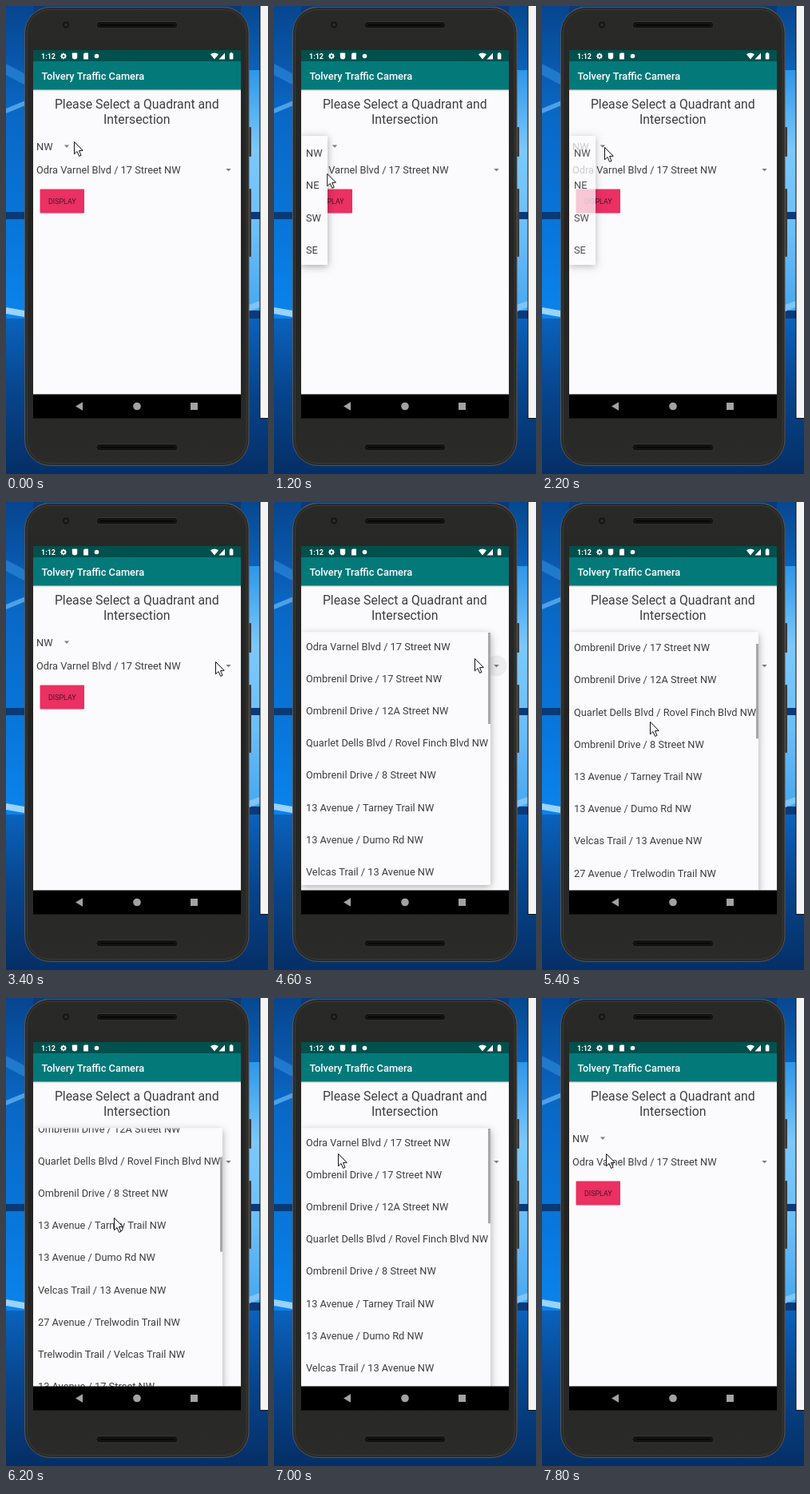
These frames come from a looping animation (328 px wide and 584 px high, 8 s). An HTML page with a canvas:

```html
<!DOCTYPE html>
<html lang="en">
<head>
<meta charset="utf-8">
<title>Traffic camera app</title>
<style>
html, body { margin: 0; width: 100%; height: 100%; overflow: hidden; background: #0a3a78; }
canvas { display: block; width: 328px; height: 584px; }
</style>
</head>
<body>
<canvas id="stage" width="328" height="584"></canvas>
<script>
const ctx = document.getElementById('stage').getContext('2d');
const LOOP = 8000, STEP = 200;
const ROW = 40.2, BODY = 12.8;
const LEFT = 34, RIGHT = 294;
const PAGE = '#fbfafd', INK = '#3e3e40', NAV = '#a3a3a3';

const quadrants = ['NW', 'NE', 'SW', 'SE'];
const crossings = [
  'Odra Varnel Blvd / 17 Street NW',
  'Ombrenil Drive / 17 Street NW',
  'Ombrenil Drive / 12A Street NW',
  'Quarlet Dells Blvd / Rovel Finch Blvd NW',
  'Ombrenil Drive / 8 Street NW',
  '13 Avenue / Tarney Trail NW',
  '13 Avenue / Dumo Rd NW',
  'Velcas Trail / 13 Avenue NW',
  '27 Avenue / Trelwodin Trail NW',
  'Trelwodin Trail / Velcas Trail NW',
  '13 Avenue / 17 Street NW',
  '13 Avenue / 22 Street NW'
];

const ramp = (t, from, to) => Math.min(1, Math.max(0, (t - from) / (to - from)));

function pointerAt(t) {
  let x = 85, y = 169;
  const move = (from, to, tx, ty) => {
    const p = ramp(t, from, to);
    x += (tx - x) * p;
    y += (ty - y) * p;
  };
  move(200, 600, 78, 176);
  move(2200, 3200, 262, 199);
  move(3400, 4200, 275, 204);
  move(4400, 4600, 251, 195);
  move(4600, 5200, 135, 274);
  move(6600, 7000, 80, 194);
  const browse = Math.sin(Math.PI * ramp(t, 1000, 2000));
  return [x - 20 * browse, y + 56 * browse];
}

// the wheel speeds up on the way down and again on the way back
const scrollAt = t => 130 * (ramp(t, 5000, 5600) ** 3 - ramp(t, 5800, 6600) ** 2);

function rect(x, y, w, h, fill) {
  ctx.fillStyle = fill;
  ctx.fillRect(x, y, w, h);
}

function round(x, y, w, h, r, fill, stroke) {
  ctx.beginPath();
  ctx.roundRect(x, y, w, h, r);
  ctx.fillStyle = fill;
  ctx.fill();
  if (!stroke) return;
  ctx.strokeStyle = stroke;
  ctx.lineWidth = 1;
  ctx.stroke();
}

function disc(x, y, r, fill) {
  ctx.beginPath();
  ctx.arc(x, y, r, 0, Math.PI * 2);
  ctx.fillStyle = fill;
  ctx.fill();
}

function poly(points, fill) {
  ctx.beginPath();
  points.forEach(([x, y]) => ctx.lineTo(x, y));
  ctx.closePath();
  ctx.fillStyle = fill;
  ctx.fill();
}

function text(str, x, y, size = BODY, fill = INK, align = 'left', weight = 400) {
  ctx.font = `${weight} ${size}px Roboto, sans-serif`;
  ctx.textAlign = align;
  ctx.fillStyle = fill;
  ctx.fillText(str, x, y);
}

function gradient(y0, y1, ...colors) {
  const g = ctx.createLinearGradient(0, y0, 0, y1);
  colors.forEach((c, i) => g.addColorStop(i / (colors.length - 1), c));
  return g;
}

function beam(x, y, w, rise, thick, fill) {
  poly([[x, y], [x + w, y - rise], [x + w, y - rise + thick], [x, y + thick]], fill);
}

function drawDesktop() {
  rect(0, 0, 34, 390, gradient(0, 390, '#07458f', '#0a67c4', '#0874d8', '#0a84ec'));
  rect(0, 390, 328, 194, gradient(390, 584, '#0a62bc', '#07438a', '#052f66'));
  rect(294, 0, 24, 80, gradient(0, 80, '#06488f', '#0c62b8'));
  rect(294, 80, 24, 300, gradient(80, 380, '#2e96e8', '#7cc8fb', '#6cbef8', '#48a8f0'));
  beam(0, 72, 34, -18, 14, 'rgba(70,165,245,.4)');
  beam(0, 128, 34, 14, 6, 'rgba(120,200,255,.6)');
  beam(0, 376, 34, -6, 8, 'rgba(190,230,255,.8)');
  beam(294, 376, 24, 8, 8, 'rgba(160,215,255,.6)');
  for (const x of [0, 294]) rect(x, 257, 24, 9, '#083a78');
  rect(317.5, 0, 11, 515, '#111');
  rect(318.5, 0, 10, 514, '#f4f4f5');
}

function drawPhone() {
  for (const [y, h] of [[151, 37], [228, 85]]) round(304, y, 3, h, 1, '#3a3a3a');
  round(23.5, 1.5, 280.5, 572, 32, '#2a2a29', '#565654');
  round(26.5, 4.5, 274.5, 566, 29, gradient(0, 574, '#292928', '#232322', '#2a2a28'), '#393937');
  for (const y of [19.5, 546.5]) {
    round(113, y, 102, 8.5, 4, '#131313', '#363634');
    rect(118, y + 3.5, 92, 1.5, '#060606');
  }
  disc(75, 23.5, 4, '#151515');
  disc(75, 23.5, 2, '#2c2c31');
}

function drawStatusIcons() {
  const y = 62.5;
  for (let a = 0; a < 8; a++) {
    disc(72 + 3.2 * Math.cos(a * Math.PI / 4), y + 3.2 * Math.sin(a * Math.PI / 4), 0.8, '#fff');
  }
  disc(72, y, 3, '#fff');
  disc(72, y, 1.2, '#00504d');
  round(82.8, y - 4, 6.4, 8, [1, 1, 4, 4], '#fff');
  round(97, y - 4, 6, 8, [2, 0.5, 0.5, 0.5], '#fff');
  disc(113.5, y, 2.8, '#fff');
  ctx.beginPath();
  ctx.moveTo(261, y + 4);
  ctx.arc(261, y + 4, 8, -Math.PI * 0.72, -Math.PI * 0.28);
  ctx.fill();
  poly([[274, y - 4], [274, y + 4], [266.5, y + 4]], '#fff');
  round(279.8, y - 3.5, 4.6, 7.6, 0.8, '#fff');
  rect(281, y - 4.5, 2.2, 1.5, '#fff');
}

function drawBars() {
  rect(LEFT, 55, RIGHT - LEFT, 14, '#00504d');
  rect(LEFT, 69, RIGHT - LEFT, 35.5, '#04797a');
  text('1:12', 44, 66, 9, '#fff', 'left', 700);
  drawStatusIcons();
  text('Tolvery Traffic Camera', 44.5, 92.3, BODY, '#fff', 'left', 500);
  rect(LEFT, 484.5, RIGHT - LEFT, 30, '#000');
  poly([[87, 499.5], [96, 494.3], [96, 504.7]], NAV);
  disc(164, 499.5, 4.8, NAV);
  rect(231, 495, 9, 9, NAV);
}

function arrow(x, y) {
  poly([[x - 3.2, y - 1.5], [x + 3.2, y - 1.5], [x, y + 1.7]], '#7b7b7d');
}

function drawForm() {
  rect(LEFT, 104, RIGHT - LEFT, 381, PAGE);
  rect(LEFT, 104, RIGHT - LEFT, 3, gradient(104, 107, 'rgba(0,0,0,.15)', 'rgba(0,0,0,0)'));
  text('Please Select a Quadrant and', 163.8, 128, 15.8, INK, 'center');
  text('Intersection', 163.8, 146.5, 15.8, INK, 'center');
  text('NW', 38, 179.6);
  arrow(76, 175);
  text(crossings[0], 38, 209);
  arrow(278.5, 204.5);
  round(42.5, 228.5, 55.5, 30, 1, '#eb3063');
  text('DISPLAY', 70.3, 246.7, 8.9, '#4a1526', 'center');
}

// the shadow stays outside the panel, so a fading panel is not darkened
function panel(x, y, w, h, blur) {
  ctx.save();
  ctx.beginPath();
  ctx.rect(0, 0, 328, 584);
  ctx.rect(x, y, w, h);
  ctx.clip('evenodd');
  ctx.shadowColor = 'rgba(0,0,0,.34)';
  ctx.shadowBlur = blur;
  ctx.shadowOffsetY = 2;
  rect(x, y, w, h, PAGE);
  ctx.restore();
  rect(x, y, w, h, PAGE);
}

function drawQuadrants(t) {
  if (t < 400 || t > 2200) return;
  const solid = t > 400 && t < 2200;
  ctx.globalAlpha = solid ? 1 : 0.75;
  panel(LEFT, 162, 33, 161, 9);
  ctx.globalAlpha = solid ? 1 : 0.9;
  quadrants.forEach((q, i) => text(q, 40, 188.2 + i * ROW));
  ctx.globalAlpha = 1;
}

function drawCrossings(t) {
  if (t >= 4400 && t <= 4600) disc(278.5, 204.5, 13 * ramp(t, 4100, 4600), 'rgba(0,0,0,.055)');
  if (t < 4600 || t > 7600) return;
  const top = 162.5, scroll = scrollAt(t);
  const height = 315.5 + 12 * ramp(t, 4600, 4800);
  ctx.save();
  ctx.globalAlpha = 1 - 0.4 * ramp(t, 7400, 7600);
  panel(LEFT, top, 271 - LEFT, height, 9);
  ctx.beginPath();
  ctx.rect(LEFT, top, 271 - LEFT, height);
  ctx.clip();
  crossings.forEach((c, i) => text(c, 40, 184.6 + i * ROW - scroll));
  if (t < 7200) rect(268, 163 + scroll * 0.363, 3, height * 0.361, '#a8a8aa');
  ctx.restore();
}

function drawPointer(x, y) {
  ctx.save();
  ctx.translate(x, y);
  poly([[0.5, 0.5], [0.5, 15.8], [4, 12.5], [6.6, 18.4], [9, 17.4], [6.5, 11.6], [11.2, 11.3]], '#fff');
  ctx.strokeStyle = '#111';
  ctx.lineWidth = 1;
  ctx.stroke();
  ctx.restore();
}

function draw(t) {
  drawDesktop();
  drawPhone();
  ctx.save();
  ctx.beginPath();
  ctx.rect(LEFT, 55, RIGHT - LEFT, 460);
  ctx.clip();
  drawForm();
  drawQuadrants(t);
  drawCrossings(t);
  drawBars();
  ctx.restore();
  drawPointer(...pointerAt(t));
}

const start = performance.now();
function tick() {
  const t = (performance.now() - start) % LOOP;
  draw(Math.floor(t / STEP) * STEP);
  requestAnimationFrame(tick);
}
tick();
</script>
</body>
</html>
```
